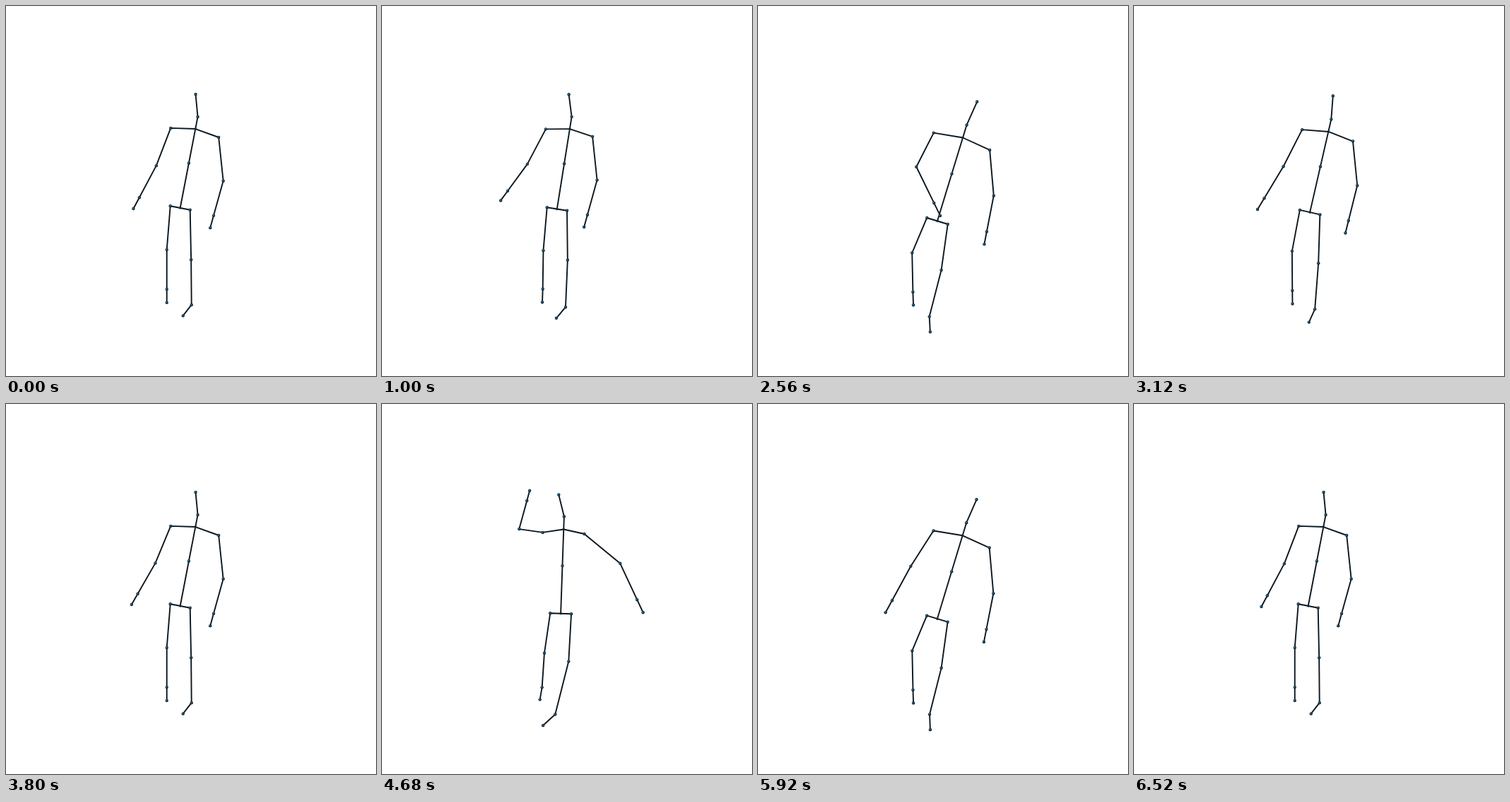
Animation of 524x524 px, one loop 6.56 s. Source, as an HTML page with a canvas:

```html
<!DOCTYPE html>
<html lang="en">
<head>
<meta charset="utf-8">
<title>Throwing figure</title>
<style>
  html, body { margin: 0; width: 100%; height: 100%; overflow: hidden; background: #fff; }
  canvas { display: block; }
</style>
</head>
<body>
<canvas id="stage" width="524" height="524"></canvas>
<script>
const LOOP = 6560, STEP = 40, THROW = 3080, SECOND = 3400;
const ctx = document.getElementById('stage').getContext('2d');

// Moments in ms: leave rest, cocked, follow-through, held, back at rest.
// The balancing arm lags behind the body.
const BODY = [780, 1540, 2280, 2800, 3320];
const ARM = [1200, 1660, 2280, 2800, 3320];

const track = (moments, ...poses) => ({ moments, poses });
const act = (moments, rest, cocked, follow) =>
  track(moments, rest, cocked, follow, follow, rest);

// A bone is [angle in degrees, length] from its parent joint.
const hipCentre = act(BODY, [246.7, 286], [253, 296], [254, 304.5]);
const spine = act(BODY, [280.9, 114], [271.7, 119], [287, 123.4]);
const head = act(BODY, [264.6, 32], [255.3, 31.5], [294, 36]);
const shoulderSpan = act(BODY, [34.6], [29.2], [41.5]);

const balanceArm = [
  act(ARM, [84, 62], [37.3, 66], [85, 65]),
  act(ARM, [105.5, 69], [63, 77], [101, 70])
];
const backLeg = [
  act(BODY, [94.6, 62], [97.7, 57.5], [113, 53.8]),
  act(BODY, [90, 56], [94, 48.5], [88.8, 55.5]),
  act(BODY, [90, 19], [100, 17.5], [88, 18.5])
];
const frontLeg = [
  act(BODY, [88.8, 70.5], [92.8, 67.6], [98, 65.6]),
  act(BODY, [89.5, 64], [104.2, 77.4], [104.4, 68]),
  act(BODY, [127.8, 19.6], [138.5, 23.4], [87, 21.7])
];

// Rest, reach out, cock, release, sweep, across, down, past, rest.
const SWING = [480, 1220, 1680, 1960, 2120, 2280, 2560, 2920, 3320];
const throwingArm = [
  track(SWING, [111, 57], [124, 55], [200, 32], [223, 55], [134, 39],
    [61, 38], [117, 54], [123, 60], [111, 57]),
  track(SWING, [118, 69], [134, 61], [298, 56], [253, 86], [60, 32],
    [24, 87], [64, 77], [124, 74], [118, 69])
];

// Monotone cubic interpolation, so nothing overshoots its poses.
function sample({ moments, poses }, t) {
  const last = moments.length - 1;
  let i = 0;
  while (i < last - 1 && t >= moments[i + 1]) i++;
  const span = moments[i + 1] - moments[i];
  const u = Math.min(1, Math.max(0, (t - moments[i]) / span)), v = 1 - u;

  return poses[i].map((from, c) => {
    const rate = k => (poses[k + 1][c] - poses[k][c]) / (moments[k + 1] - moments[k]);
    const slope = k => {
      if (k === 0 || k === last) return 0;
      const a = rate(k - 1), b = rate(k);
      return a * b > 0 ? 2 * a * b / (a + b) : 0;
    };
    return from * v * v * (1 + 2 * u) + poses[i + 1][c] * u * u * (3 - 2 * u)
      + span * u * v * (slope(i) * v - slope(i + 1) * u);
  });
}

const mix = (a, b, k) => a.map((value, i) => value + (b[i] - value) * k);

function extend([x, y], [degrees, length]) {
  const angle = degrees * Math.PI / 180;
  return [x + Math.cos(angle) * length, y + Math.sin(angle) * length];
}

function chain(start, bones, t) {
  const joints = [start];
  for (const bone of bones) joints.push(extend(joints.at(-1), sample(bone, t)));
  return joints;
}

function arm(start, bones, t) {
  const [shoulder, elbow, hand] = chain(start, bones, t);
  return [shoulder, elbow, mix(elbow, hand, 0.74), hand];
}

// The trunk sets the spine line; shoulders and hips lie square to it.
function skeleton(t) {
  const pelvis = sample(hipCentre, t);
  const [lean, height] = sample(spine, t);
  const [span] = sample(shoulderSpan, t);
  const chest = extend(pelvis, [lean, height]);
  const neck = extend(chest, [lean, height * 0.153]);
  const collar = extend(chest, [lean, -5.5]);
  const beside = (centre, distance) => extend(centre, [lean + 90, distance]);
  const hip = height * 0.125;

  return {
    chest,
    pelvis,
    trunk: [extend(neck, sample(head, t)), neck, chest, mix(chest, pelvis, 0.433), pelvis],
    arms: [arm(beside(collar, -span), throwingArm, t), arm(beside(collar, span), balanceArm, t)],
    legs: [chain(beside(pelvis, -hip), backLeg, t), chain(beside(pelvis, hip), frontLeg, t)]
  };
}

function line(joints) {
  ctx.beginPath();
  joints.forEach(joint => ctx.lineTo(...joint));
  ctx.stroke();
}

function dot([x, y], radius, color) {
  ctx.fillStyle = color;
  ctx.beginPath();
  ctx.arc(x, y, radius, 0, Math.PI * 2);
  ctx.fill();
}

function draw(t) {
  const { chest, pelvis, trunk, arms, legs } = skeleton(t);
  ctx.fillStyle = '#fff';
  ctx.fillRect(0, 0, 524, 524);
  ctx.strokeStyle = '#0b161e';
  ctx.lineWidth = 1.9;
  ctx.lineJoin = 'round';
  line(trunk);
  arms.forEach(joints => line([chest, ...joints]));
  legs.forEach(joints => line([pelvis, ...joints]));

  for (const joint of [trunk, ...arms, ...legs].flat()) {
    const hub = joint === chest || joint === pelvis;
    dot(joint, hub ? 1.8 : 2.2, '#12293a');
    if (!hub) dot([joint[0] - 0.4, joint[1] - 0.4], 1.1, '#34708f');
  }
}

function tick() {
  const clock = Math.floor(performance.now() % LOOP / STEP) * STEP;
  draw(clock < SECOND ? clock : clock - THROW);
  requestAnimationFrame(tick);
}
tick();
</script>
</body>
</html>
```
